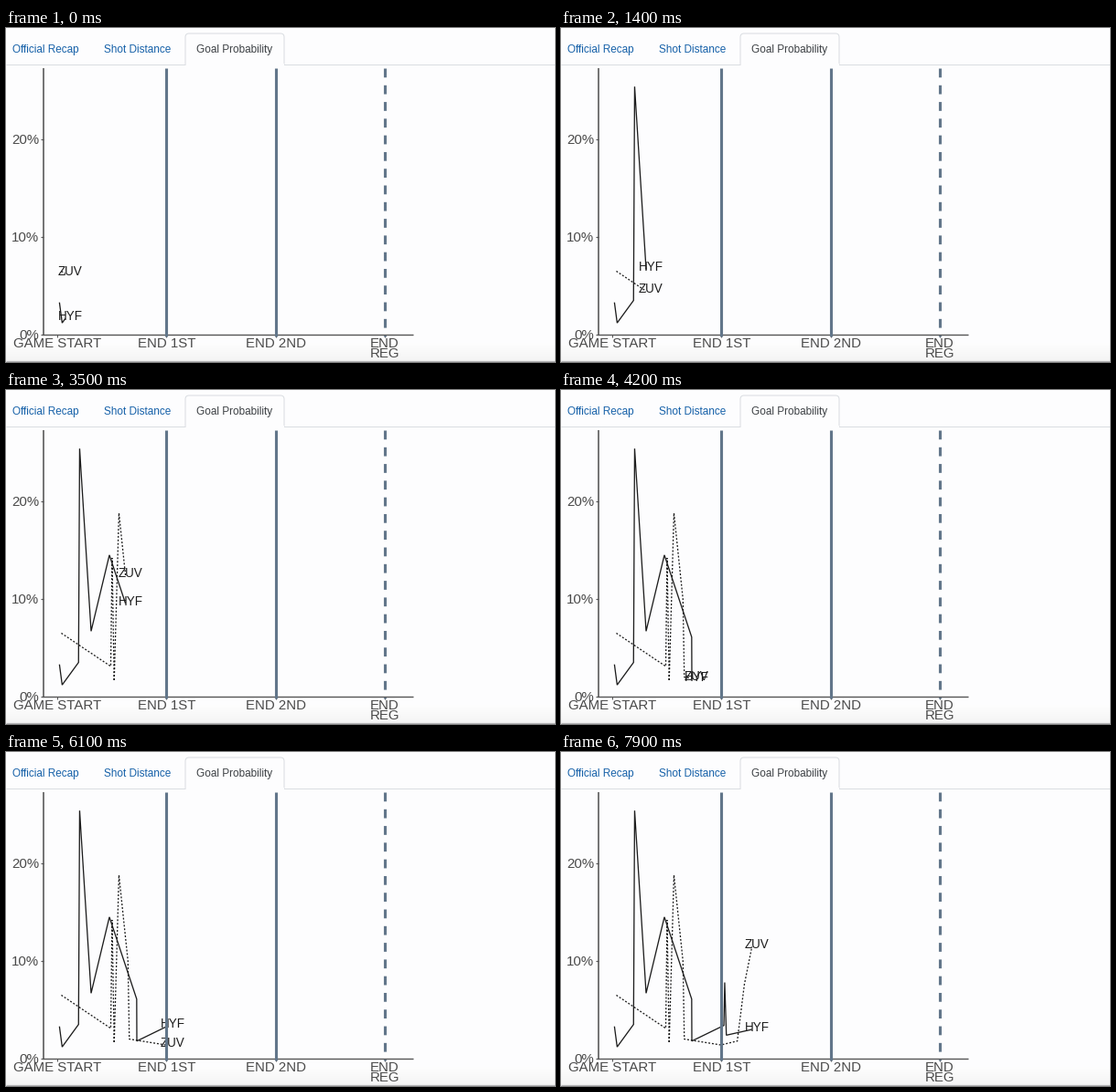
Recreate the animation shown at these times as a matplotlib script. Size 600x366 px, loop 8000 ms.

```python
import numpy as np
import matplotlib.pyplot as plt
from matplotlib.animation import FuncAnimation
from matplotlib.patches import FancyBboxPatch, Rectangle

W, H, DPI = 600, 366, 100
FRAMES, INTERVAL = 80, 100
PX = 72 / DPI  # points per pixel

PAPER = "#fdfdfe"
INK = "#1c1c1c"
AXIS = "#555555"
AXIS_TEXT = "#4a4a4a"
SLATE = "#62768a"
LINK = "#1560a8"
BORDER = "#dadde1"

LEFT, BASE, TOP = 41, 336.5, 44
PERIOD = 20  # minutes

# Turning points: (minute, probability in percent)
HOME = [(0.4, 3.3), (0.9, 1.2), (3.9, 3.5), (4.1, 25.4), (6.2, 6.7),
        (9.55, 14.5), (14.55, 6.1), (14.58, 1.8), (20.45, 3.4),
        (20.6, 7.8), (20.9, 2.4), (25.7, 3)]
AWAY = [(0.75, 6.5), (9.8, 3.1), (10.05, 14.2), (10.43, 1.6),
        (11.3, 18.8), (12.95, 10), (13.2, 2), (19.9, 1.4),
        (22.9, 1.8), (24.2, 7.6), (25.6, 11.5)]

plt.rcParams["font.family"] = "Liberation Sans"
fig = plt.figure(figsize=(W / DPI, H / DPI), dpi=DPI, facecolor=PAPER)
ax = fig.add_axes([0, 0, 1, 1])
ax.axis("off")


def px(minute):
    return 56.5 + 5.967 * minute


def py(percent):
    return BASE - 10.7 * percent


def line(xs, ys, color, width, **kw):
    kw.setdefault("solid_capstyle", "butt")
    return ax.plot(xs, ys, color=color, lw=width * PX, **kw)[0]


def text(x, y, s, size, color, ha="left", **kw):
    return ax.text(x, y, s, fontsize=size * PX, color=color, ha=ha,
                   va="baseline", **kw)


def draw_page():
    shade = np.linspace(0.992, 0.955, 20)[:, None]
    ax.imshow(shade, cmap="gray", vmin=0, vmax=1, aspect="auto",
              extent=(0, W + 1, H, 346), zorder=0)
    line([0, W + 1], [365.5, 365.5], "#b4b4b6", 1.2)
    line([0, W + 1], [40.5, 40.5], BORDER, 1)

    # Active tab, with its lower edge opened onto the page
    ax.add_patch(FancyBboxPatch(
        (196.5, 6.5), 108, 40, boxstyle="round,pad=0,rounding_size=4",
        fc=PAPER, ec=BORDER, lw=PX, zorder=3))
    ax.add_patch(Rectangle((195, 41.2), 111, 7, fc=PAPER, ec="none", zorder=3))
    ax.add_patch(Rectangle((197, 39), 107, 3, fc=PAPER, ec="none", zorder=3))
    for x, s, color in ((7.4, "Official Recap", LINK),
                        (107.9, "Shot Distance", LINK),
                        (209, "Goal Probability", "#3c4044")):
        text(x, 27.7, s, 11.75, color, zorder=4)


def draw_axes():
    line([LEFT, LEFT], [TOP, BASE], AXIS, 1.6)
    line([LEFT - 0.8, 445], [BASE, BASE], AXIS, 1.4)
    for percent in (0, 10, 20):
        y = py(percent)
        line([LEFT - 3, LEFT], [y, y], AXIS, 1.2)
        text(36.5, y + 5, f"{percent}%", 15, AXIS_TEXT, "right")

    for k, name in enumerate(("GAME START", "END 1ST", "END 2ND", "END\nREG")):
        x = px(k * PERIOD)
        line([x, x], [BASE, BASE + 2.5], AXIS, 1)
        for row, word in enumerate(name.split("\n")):
            text(x, 350 + 11.5 * row, word, 15, AXIS_TEXT, "center")
        if k:
            dash = (0, (3.15, 2.75)) if k == 3 else "-"
            line([x, x], [TOP + 0.5, BASE + 2], SLATE, 3.1, ls=dash,
                 dash_capstyle="butt", zorder=8)


def make_series(points, name, **style):
    curve = line([], [], INK, 1.3, zorder=5, solid_joinstyle="miter",
                 dash_joinstyle="miter", **style)
    return np.array(points).T, curve, text(0, 0, name, 13.5, INK, zorder=6)


draw_page()
draw_axes()
series = [
    make_series(HOME, "HYF"),
    make_series(AWAY, "ZUV", ls=(0, (1.5, 1.5)), dash_capstyle="butt"),
]
# Half-pixel offset: coordinates name pixel centres
ax.set_xlim(0.5, W + 0.5)
ax.set_ylim(H + 0.5, 0.5)


def update(i):
    # Steady reveal after a short catch-up
    now = 2.09 + 0.2975 * i - 0.6 * np.exp(-i / 5)
    for (t, p), curve, label in series:
        end = np.interp(now, t, p)
        seen = t < now
        curve.set_data(px(np.append(t[seen], now)),
                       py(np.append(p[seen], end)))
        label.set_position((px(now) - 8.2, py(end) + 2))
    return [artist for s in series for artist in s[1:]]


anim = FuncAnimation(fig, update, frames=FRAMES, interval=INTERVAL,
                     repeat=True, repeat_delay=0, blit=False)
plt.show()
```
